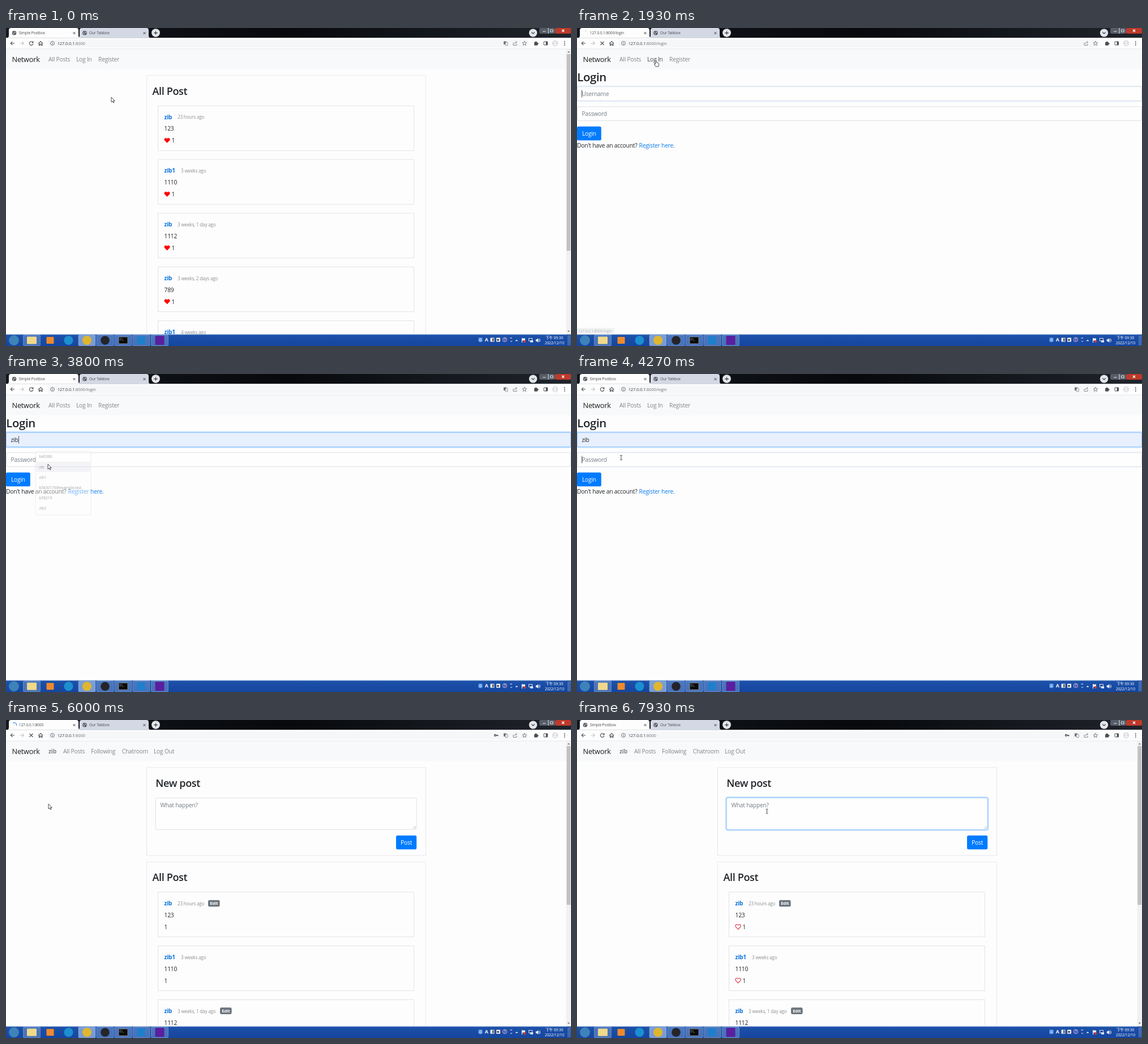
An HTML page that plays this animation: 998x561 px, repeating every 8000 ms.

```html
<!DOCTYPE html>
<html lang="en">
<head>
<meta charset="utf-8">
<title>Posting site walkthrough</title>
<style>
html, body { margin: 0; height: 100%; overflow: hidden; background: #fdfdfd; }
svg { display: block; width: 100vw; height: 100vh; }
text { font-family: "Open Sans", "Noto Sans", sans-serif; letter-spacing: -.02em; white-space: pre; }
.cjk { font-family: "Noto Sans CJK TC", "Noto Sans CJK", sans-serif; letter-spacing: 0; }
</style>
</head>
<body>
<svg viewBox="0 0 998 561">
  <defs>
    <linearGradient id="bar" x2="0" y2="1">
      <stop stop-color="#4d7cc4"/><stop offset=".1" stop-color="#1c50a8"/><stop offset="1" stop-color="#1546a0"/>
    </linearGradient>
    <linearGradient id="title"><stop stop-color="#15181f"/><stop offset=".5" stop-color="#07090c"/><stop offset="1" stop-color="#20242b"/></linearGradient>
  </defs>
  <g id="page"></g><g id="frame"></g><g id="live"></g>
</svg>
<script>
const LOOP = 8000;
const LOGIN_AT = 1890, FEED_AT = 5950;
const MENU_OPEN = 2900, MENU_PICK = 3730, PASSWORD_FOCUS = 4250, POST_FOCUS = 7430;
const KEYS = [4500, 4720, 4930];
const LOADING = [[1750, 2200], [5650, 6090]];
const USER = 'zib';
const ACCOUNTS = ['b40386', 'zib', 'zib1', 'k5830176@example.test', 'b58219', 'zib2'];
const POSTS = [
  ['zib', '23 hours ago', '123', 303], ['zib1', '3 weeks ago', '1110', 309],
  ['zib', '3 weeks, 1 day ago', '1112', 303], ['zib', '3 weeks, 2 days ago', '789', 303],
  ['zib1', '4 weeks ago', '1109', 309]
];
// time, x, y of the pointer's hot spot
const PATH = [
  [0, 186, 122], [450, 186, 122], [1250, 139.5, 57], [1960, 139.5, 57], [2550, 90.5, 112],
  [2950, 90.5, 112], [3450, 74, 159], [3850, 74, 159], [4180, 78, 147.5], [5300, 78, 147.5],
  [5600, 75, 148], [6300, 75, 148], [6950, 335.5, 161], [LOOP, 335.5, 161]
];

const clamp = v => Math.max(0, Math.min(1, v));
const text = (x, y, size, str, fill = '#212529', extra = '') =>
  `<text x="${x}" y="${y}" font-size="${size}" fill="${fill}" ${extra}>${str}</text>`;
const rect = (x, y, w, h, fill, r = 0, extra = '') =>
  `<rect x="${x}" y="${y}" width="${w}" height="${h}" rx="${r}" fill="${fill}" ${extra}/>`;
const circle = (x, y, r, fill, extra = '') => `<circle cx="${x}" cy="${y}" r="${r}" fill="${fill}" ${extra}/>`;
const line = (d, color = '#4d5156', width = 1.1, fill = 'none') =>
  `<path d="${d}" fill="${fill}" stroke="${color}" stroke-width="${width}"/>`;
const at = (x, y, inner) => `<g transform="translate(${x} ${y})">${inner}</g>`;
const BOLD = 'font-weight="700"', SEMI = 'font-weight="600"', MIDDLE = 'text-anchor="middle"';

function pointerAt(t) {
  const i = PATH.findIndex(p => p[0] > t);
  const [t0, x0, y0] = PATH[i - 1], [t1, x1, y1] = PATH[i];
  const k = (t - t0) / (t1 - t0), e = k * k * (3 - 2 * k);
  return { x: x0 + (x1 - x0) * e, y: y0 + (y1 - y0) * e };
}

function pointer(kind, { x, y }) {
  const shapes = {
    arrow: line('M0 0V8.8L2.1 7 3.6 10 5 9.4 3.6 6.5H6.2Z', '#222', .8, '#fff'),
    hand: line('M-1 .8Q0-.6 1 .8V4L4 4.6Q5.3 5 5.2 6.5L4.4 11H-.5L-3 7Q-3.2 5.5-1 6.7Z', '#222', .8, '#fff'),
    beam: line('M-1.8-4H-.5L0-3.5.5-4H1.8M0-3.5V3.5M-1.8 4H-.5L0 3.5.5 4H1.8', '#333', .9)
  };
  return at(x.toFixed(2), y.toFixed(2), shapes[kind]);
}

const caret = (x, y, since, t) => (t - since) % 1000 < 500 ? rect(x, y - 6.5, .8, 13, '#222') : '';

function field(x, y, w, h, focus, fill = '#fefefe') {
  return rect(x - 1, y - 1, w + 2, h + 2, 'none', 3, `stroke="#007bff" stroke-width="2.4" opacity="${.27 * focus}"`) +
    rect(x, y, w, h, fill, 2.5, `stroke="${focus > .5 ? '#80bdff' : '#ced4da'}" stroke-width=".7"`);
}

const button = (x, y, w, label) =>
  rect(x, y, w, 24.5, '#007bff', 2.6) + text(x + w / 2, y + 16.3, 10.25, label, '#fff', MIDDLE);

const panel = (x, y, w, h, color) => rect(x, y, w, h, 'none', 0, `stroke="${color}" stroke-width=".8"`);

function navbar(items, hovered) {
  return rect(0, 37, 998, 36, '#f8f9fa') + text(10.5, 60.2, 12.8, 'Network', '#1c1c1c') +
    items.map(([x, label]) => text(x, 59.4, 10.25, label, label === hovered ? '#4c4d4d' : '#858686',
      label === USER ? BOLD : '')).join('');
}

const HEART = 'M0 4.4L-4.2.2C-6.4-2.4-2.4-6 0-2.7 2.4-6 6.4-2.4 4.2.2Z';

function post([name, age, body, ageX], y, signedIn, heart) {
  const badgeX = age.length > 13 ? 378 : 357;
  const edit = signedIn && name === USER
    ? rect(badgeX, y + 14, 20.6, 11.6, '#6c757d', 2.4) + text(badgeX + 10.3, y + 22.6, 7.7, 'Edit', '#fff', `${BOLD} ${MIDDLE}`) : '';
  return panel(268.5, y, 452, 79, '#dcdee4') +
    text(279.5, y + 23.3, 10.1, name, '#0d74dc', BOLD) + text(ageX, y + 23.2, 8.1, age, '#8b8f93') + edit +
    text(279.5, y + 44.2, 10.25, body) + text(heart ? 292.6 : 279.5, y + 65, 10.25, '1') +
    (heart ? at(284.6, y + 61, heart === 'full' ? line(HEART, 'red', .4, 'red') : line(HEART, '#dc3545', 1.1)) : '');
}

function postList(top, signedIn, heart) {
  return panel(248.4, top, 493, 600, '#e6e6ec') + text(258.5, top + 34, 18, 'All Post', '#212529', SEMI) +
    POSTS.map((p, i) => post(p, top + 53.5 + i * 94.8, signedIn, heart)).join('');
}

const scrollbar = end => rect(989.5, 37, 8.5, 504, '#f1f1f1') + rect(990.3, 46, 6.8, end - 46, '#c1c1c1') +
  line('M992 43L993.8 41 995.6 43ZM992 534L993.8 536 995.6 534Z', '#666', .3, '#666');

const GUEST_NAV = [[75, 'All Posts'], [124, 'Log In'], [163, 'Register']];
const USER_NAV = [[75, USER], [101, 'All Posts'], [150, 'Following'], [204.7, 'Chatroom'], [261, 'Log Out']];

function menu(row, opacity) {
  return `<g opacity="${opacity.toFixed(2)}">` + rect(52, 137, 98, 111.5, '#fff', 1.5, 'stroke="#c8c8cc" stroke-width=".7"') +
    (row >= 0 ? rect(52.5, 154.6 + (row - 1) * 18.2, 97, 18.2, '#e6e6ef') : '') +
    ACCOUNTS.map((a, i) => text(58.6, 148.4 + i * 18.2, 6.8, a, '#333')).join('') + '</g>';
}

function loginPage(t, p, hovered) {
  const onPassword = t >= PASSWORD_FOCUS;
  const focus2 = clamp((t - PASSWORD_FOCUS) / 150);
  const focus1 = clamp((t - LOGIN_AT) / 150) - focus2;
  const menuOpacity = t < MENU_OPEN ? 0 : 1 - clamp((t - MENU_PICK) / 120);
  const row = menuOpacity && p.y > 137 ? Math.floor((p.y - 137) / 18.2) : -1;
  const value = t >= MENU_PICK ? USER : ACCOUNTS[row] || '';
  const dots = KEYS.filter(k => t >= k).length;
  const since = t >= MENU_PICK ? MENU_PICK : t >= MENU_OPEN ? MENU_OPEN : LOGIN_AT;
  const passwordSince = dots ? KEYS[dots - 1] : PASSWORD_FOCUS;
  return navbar(GUEST_NAV, hovered) + text(.3, 94, 20.4, 'Login', '#212529', SEMI) +
    field(.5, 103.5, 997, 24.8, focus1, value ? '#e8f0fe' : '#fefefe') +
    text(8.5, 120.2, 10.25, value || 'Username', value ? '#212529' : '#757c83') +
    field(.5, 138.8, 997, 24.6, focus2) +
    (dots ? KEYS.slice(0, dots).map((_, i) => circle(10.9 + i * 4.1, 152, 1.5, '#333')).join('')
      : text(8.5, 155.4, 10.25, 'Password', '#757c83')) +
    (onPassword ? caret(8.4 + dots * 4.1, 151, passwordSince, t)
      : caret(t >= MENU_PICK ? 22.2 : 8.3, 116, since, t)) +
    button(0, 173.8, 42.8, 'Login') + text(0, 210.5, 10.25, "Don't have an account?") +
    text(109.5, 210.5, 10.25, 'Register here.', '#0d7cf0') +
    (menuOpacity ? menu(row, menuOpacity) : '');
}

function feedPage(t, loaded) {
  const focus = clamp((t - POST_FOCUS) / 150);
  return navbar(USER_NAV) + panel(248.4, 84, 493, 155, '#e2e2ea') +
    text(264.3, 117.5, 18, 'New post', '#212529', SEMI) + field(264.3, 137.4, 460.8, 55.8, focus) +
    text(272.5, 153.8, 10.25, 'What happen?', '#757c83') +
    line('M719.5 191.5L723.5 187.5M722 191.5L723.5 190', '#777', .6) +
    (focus ? caret(272, 150, POST_FOCUS, t) : '') + button(689, 203.7, 36.2, 'Post') +
    postList(250.2, true, loaded ? 'line' : '') + scrollbar(326);
}

const globe = x => circle(x, 8.8, 3.8, '#50545a') +
  line(`M${x - 3} 8L${x - .5} 9.3 ${x - 1.2} 11.5M${x + .2} 6L${x + 1} 8 ${x + 3} 8.6`, '#e8eaed', 1);
const cross = (x, y, r, color = '#444', w = 1) =>
  line(`M${x - r} ${y - r}L${x + r} ${y + r}M${x + r} ${y - r}L${x - r} ${y + r}`, color, w);
const tab = (x, w, fill) => `<path d="M${x - 3} 17.5Q${x} 17 ${x} 13V4Q${x} 0 ${x + 4} 0H${x + w - 4}Q${x + w} 0 ${x + w} 4V13Q${x + w} 17 ${x + w + 3} 17.5Z" fill="${fill}"/>`;

function browserFrame() {
  return rect(0, 0, 998, 17.5, 'url(#title)') + tab(130, 122, '#d3d8e4') + tab(5, 123, '#fdfdfd') +
    globe(139) + text(147, 11.3, 6.7, 'Our Talkbox', '#4a4d52') + cross(120.5, 9, 2) + cross(244.5, 9, 2) +
    circle(264.5, 8.6, 7.4, '#e2e5ea') + line('M261.3 8.6H267.7M264.5 5.4V11.8', '#333') +
    circle(931, 8.6, 7.2, '#e2e5ea') + line('M928.2 7.4L931 10 933.8 7.4', '#333') +
    rect(942, 0, 28, 10, '#555d68', 2) + rect(970, 0, 28, 10, '#bd3a2b', 2) +
    line('M948 6H953.5M961.5 3H966.2V6.8H961.5ZM958 0V10', '#e8e8e8', 1) + cross(984, 4.8, 2, '#fff', 1.3) +
    rect(0, 17.5, 998, 19.5, '#fdfdfd') + rect(0, 36.6, 998, .7, '#dfe1e5') + rect(73, 20, 850, 14.3, '#f6f7f9', 7) +
    line('M15 27H8.4M11.4 23.8L8.2 27 11.4 30.2') + line('M24.5 27H31.2M28.2 23.8L31.4 27 28.2 30.2', '#c1c4c8') +
    line('M57.3 27.3L61.2 23.5 65.1 27.3M58.5 26.5V30.7H60V28.2H62.4V30.7H64V26.5') +
    circle(82, 27, 3.4, 'none', 'stroke="#5f6368" stroke-width=".9"') + line('M82 26.4V29M82 24.8V25.6', '#5f6368', .9) +
    line('M896 26V30.4H902V28M897.6 28Q898 25 902 25M900.3 23L902.5 25 900.3 27', '#6f7378', .8) +
    line('M915.8 23.2L916.9 25.8 919.6 26 917.5 27.8 918.2 30.5 915.8 29 913.4 30.5 914.1 27.8 912 26 914.7 25.8Z', '#5f6368', .8) +
    rect(933, 25, 6, 5.7, '#4d5156', .8) + circle(936, 24.8, 1.4, '#4d5156') + circle(939.3, 27.6, 1.3, '#4d5156') +
    rect(950, 24, 6.6, 6, 'none', .5, 'stroke="#4d5156"') + rect(953.6, 24, 3, 6, '#4d5156') +
    circle(970, 27, 5.3, '#dcdde3') + circle(970, 25.6, 1.8, '#fafafa') + line('M966.8 30Q970 26.5 973.2 30Z', '#fafafa', .5, '#fafafa') +
    [24, 27, 30].map(y => circle(986.7, y, .9, '#4d5156')).join('');
}

function taskbar() {
  const slots = [[30.5, .3], [128, .6], [160, .3], [192, .3], [224, .3], [256.5, .3]];
  const white = (x, w = 6) => rect(x, 546.5, w, 7, '#e9eef8', .6);
  return rect(0, 540.5, 998, 20.5, 'url(#bar)') +
    slots.map(([x, o]) => rect(x, 541.5, 30, 19, '#bcd3f2', 1.5, `fill-opacity="${o}" stroke="#a9c3ea" stroke-opacity=".7" stroke-width=".6"`)).join('') +
    circle(14, 551, 9, '#3d82b8') +
    rect(37, 544.5, 17, 13, '#f0d98a', 1) + rect(71.5, 545, 13, 12, '#ef8a2c', 1) + circle(110.5, 551, 8, '#1c8fd0') +
    circle(143, 551, 8, '#e0b62f') + circle(175, 551, 7.8, '#25242a') +
    rect(199, 545, 16, 12, '#0a0a0a', .5, 'stroke="#aaa" stroke-width=".7"') + text(200.5, 551, 4.5, 'C:\\_', '#eee') +
    rect(231.5, 544, 14, 14, '#1f7fcc', 1) + rect(263.5, 543, 16, 16, '#5a1f9e', 1) +
    rect(834.5, 546, 7, 8, '#3f86e0', .8) + text(838, 552.5, 7, '中', '#fff', `class="cjk" ${MIDDLE}`) +
    text(848.7, 553.2, 9, 'A', '#fff', `${BOLD} ${MIDDLE}`) + white(855.5, 7) + rect(859, 547.5, 2.5, 5, '#555') +
    white(866, 7) + rect(867, 549, 4, 2.5, '#444') +
    circle(881, 549.7, 3.8, '#4d50a8', 'stroke="#d8d8f0" stroke-width=".7"') + text(881, 552.3, 6.5, '?', '#fff', MIDDLE) +
    line('M890.5 547H894M891 552L892.5 553.5 894 552', '#fff', 1) + line('M900 552L902 550 904 552Z', '#fff', .4, '#fff') +
    line('M911.5 547V555', '#fff', 1) + rect(912, 547.5, 5, 4, '#f0f0f0') + circle(916, 553, 2.2, '#d63b2f') +
    rect(923.5, 547.5, 6, 4.5, 'none', 0, 'stroke="#eee" stroke-width=".9"') + rect(926, 551, 5, 3.6, '#e2e8f2') +
    line('M936 549.5H938L940 547.5V554.5L938 552.5H936Z', '#fff', .4, '#fff') + line('M941.3 549Q942.6 551 941.3 553M942.6 547.8Q944.7 551 942.6 554.2', '#fff', .7) +
    text(968.5, 549.3, 6.6, '下午 09:30', '#fff', `class="cjk" ${MIDDLE}`) + text(968.8, 558, 6.7, '2022/12/10', '#fff', MIDDLE) +
    rect(991, 541.5, 7, 19, '#7ea0d6', 0, 'fill-opacity=".35" stroke="#0d2f6c" stroke-width=".6"');
}

function liveChrome(t, stage, loading) {
  const url = stage === 'login' ? ':8000/login' : ':8000';
  const committed = loading && (t >= FEED_AT || (t >= LOGIN_AT && t < LOADING[0][1]));
  const title = committed ? '127.0.0.1' + url : 'Simple Postbox';
  const angle = Math.round((t - FEED_AT) * .4);
  const spinner = committed
    ? `<g transform="rotate(${stage === 'login' ? 0 : angle} 14.5 8.8)">` +
      line(stage === 'login' ? 'M14.5 4.8Q15.5 4.8 16.3 5.2' : 'M11 6.8A4 4 0 0 1 18.5 8.8', stage === 'login' ? '#9aa0a6' : '#4a90e8', 1) + '</g>'
    : `<g transform="rotate(${-angle} 14.5 8.8)">` + line('M14.5 4.8A4 4 0 1 0 18.5 8.8', '#9aa0a6', 1) + '</g>';
  const translate = !(loading && stage === 'login');
  return (loading ? spinner : globe(14.5)) + text(22.7, 11.3, 6.7, title, '#4a4d52') +
    (loading ? cross(44.5, 27, 3, '#4d5156', 1.1)
      : line('M47.4 25.3A3.3 3.3 0 1 0 47.8 28M47.9 23.3V26H45.2')) +
    text(90.7, 29.8, 7.55, `127.0.0.1<tspan fill="#73777c">${url}</tspan>`, '#3a3d41') +
    (translate ? rect(879, 23.5, 4.8, 5.6, '#6f7378', .6) + rect(882, 25.2, 4.2, 5.4, '#fdfdfd', .6, 'stroke="#6f7378" stroke-width=".8"') : '') +
    (t >= KEYS[0] ? circle(864, 27, 1.5, 'none', 'stroke="#4d5156" stroke-width="1.3"') + line('M865.5 27H869.5M868.3 27V28.8', '#4d5156', 1.3) : '');
}

function statusBubble(t) {
  const opacity = clamp((t - 1250) / 120) * (1 - clamp((t - 1870) / 110));
  return opacity ? `<g opacity="${opacity.toFixed(2)}">` + rect(0, 529, 66, 11.8, '#e3e5ea', 1.5) +
    text(2.3, 537.2, 6.6, '127.0.0.1:8000/login', '#5f6368') + '</g>' : '';
}

function pointerKind(stage, { x, y }, t, overLogin) {
  if (overLogin) return 'hand';
  const menuShown = t >= MENU_OPEN && t < MENU_PICK + 120;
  const inLogin = stage === 'login' && ((y > 103 && y < 129) || (y > 138 && y < 164 && !menuShown));
  const inPost = stage === 'feed' && x > 264 && x < 725 && y > 137 && y < 193;
  return inLogin || inPost ? 'beam' : 'arrow';
}

const shown = {};
function show(id, markup) {
  if (shown[id] !== markup) document.getElementById(id).innerHTML = shown[id] = markup;
}

function render(t) {
  const stage = t < LOGIN_AT ? 'home' : t < FEED_AT ? 'login' : 'feed';
  const loading = LOADING.some(([from, to]) => t >= from && t < to);
  const p = pointerAt(t);
  const overLogin = stage !== 'feed' && p.x > 122 && p.x < 154 && p.y > 46 && p.y < 68;
  const hovered = overLogin ? 'Log In' : '';
  show('page', stage === 'home' ? navbar(GUEST_NAV, hovered) + postList(83.7, false, 'full') + scrollbar(393)
    : stage === 'login' ? loginPage(t, p, hovered) : feedPage(t, !loading));
  show('live', liveChrome(t, stage, loading) + statusBubble(t) + pointer(pointerKind(stage, p, t, overLogin), p));
}

show('frame', browserFrame() + taskbar());
const start = performance.now();
function tick() {
  render((performance.now() - start) % LOOP);
  requestAnimationFrame(tick);
}
tick();
</script>
</body>
</html>
```
